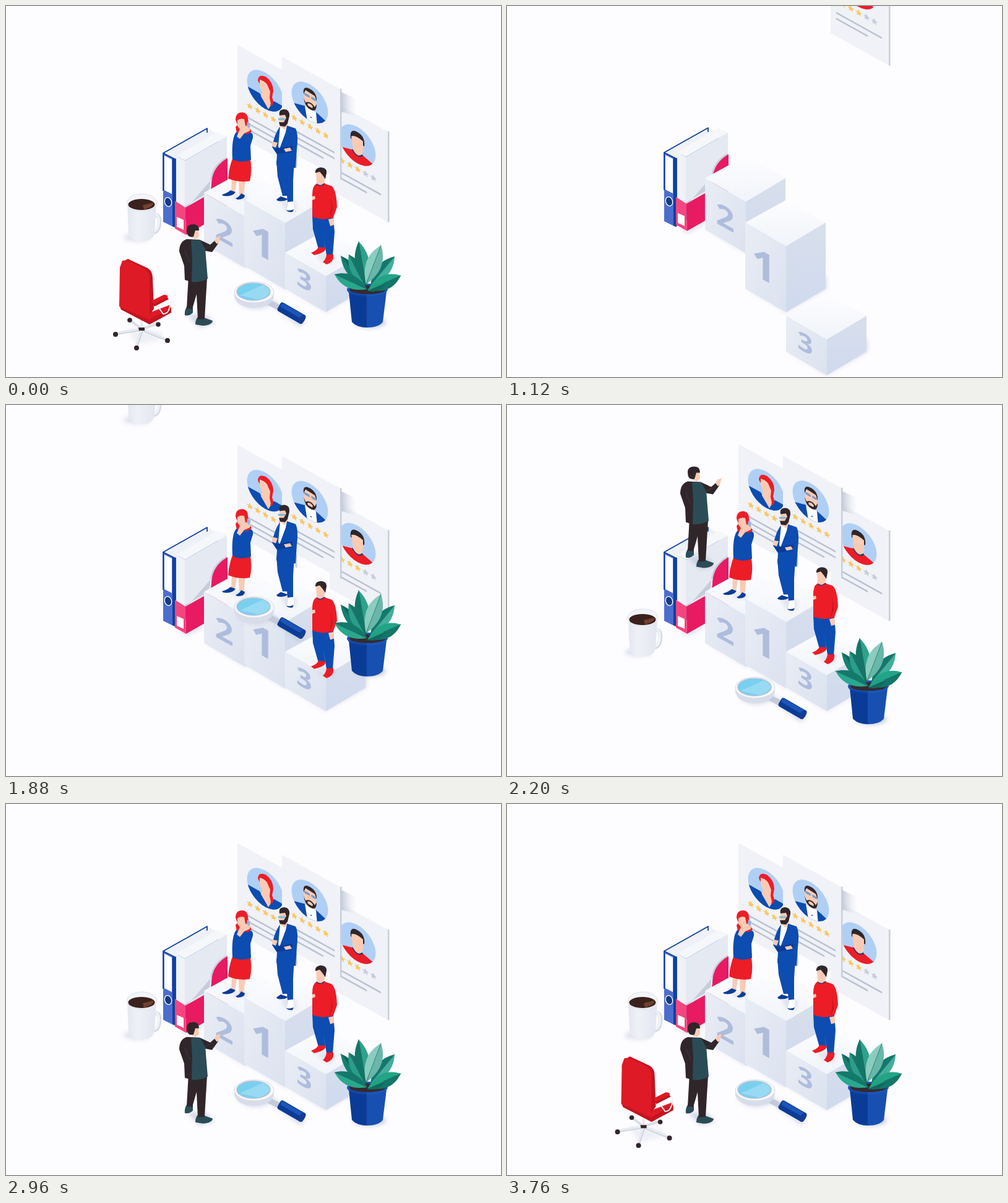
An HTML page for the animation above (3.8 s loop, 800 px wide and 600 px high).

```html
<!DOCTYPE html>
<html lang="en">
<head>
<meta charset="utf-8">
<title>Candidate podium</title>
<style>
html, body { margin: 0; width: 100%; height: 100%; overflow: hidden; background: #fdfcff; }
svg { display: block; width: 800px; height: 600px; }
.b { fill: #0d4cb0 } .n { fill: #0a3c97 } .r { fill: #ec1d27 } .m { fill: #c4141f }
.k { fill: #f9cbb4 } .d { fill: #30262a } .t { fill: #2b4c57 } .w { fill: #fff }
.s { fill: #b7bfd4; filter: url(#soft) }
.num { font: 700 40px "Open Sans", "Noto Sans", sans-serif; fill: #aebddb; text-anchor: middle }
.line { fill: none; stroke-linecap: round; stroke-linejoin: round }
#chair .r { fill: #de1a26 }
</style>
</head>
<body>
<svg viewBox="0 0 800 600">
<defs>
  <filter id="soft" x="-40%" y="-40%" width="180%" height="180%"><feGaussianBlur stdDeviation="3"/></filter>
  <linearGradient id="top" x2="0" y2="1"><stop stop-color="#fdfdff"/><stop offset="1" stop-color="#f1f4f9"/></linearGradient>
  <linearGradient id="left" x2="1" y2="1"><stop stop-color="#e9edf5"/><stop offset="1" stop-color="#dbe2ef"/></linearGradient>
  <linearGradient id="right" x2="0" y2="1"><stop stop-color="#d8dfec"/><stop offset="1" stop-color="#cfdaee"/></linearGradient>
  <linearGradient id="cup"><stop stop-color="#e4e7f0"/><stop offset=".35" stop-color="#eff1f7"/><stop offset="1" stop-color="#e2e5ef"/></linearGradient>
  <linearGradient id="cast"><stop stop-color="#b4bccb" stop-opacity=".8"/><stop offset="1" stop-color="#dfe3ec" stop-opacity="0"/></linearGradient>
  <clipPath id="disc"><circle cx="45" cy="49" r="29.5"/></clipPath>
</defs>

<g id="binder">
  <path fill="#1853b0" d="M272 247 343 207V317L272 358Z"/>
  <path fill="#eef1f7" d="M254 238 325 198 343 208 272 248Z"/>
  <path fill="#4c6dcc" d="M254 238 272 247V358L254 349Z"/>
  <path fill="#0f409f" d="M269 246 274 247V358L269 356Z"/>
  <path class="line" stroke="#0f409f" stroke-width="1.8" d="M325 204V198L254 238 272 247M254 238V298"/>
  <path class="w" d="M256 242 268 248V304L256 298Z"/>
  <ellipse cx="262" cy="317" rx="5.5" ry="7.5" fill="#123a86" stroke="#fff" stroke-width="1.3" transform="rotate(-18 262 317)"/>
</g>

<g id="file">
  <path class="s" opacity=".4" d="M280 366 320 348 316 362 291 374Z"/>
  <path fill="#f5f7fb" d="M275 242 342 204 357 211 289 250Z"/>
  <path fill="#f0f2f8" d="M275 242 289 250V328L275 319Z"/>
  <path fill="#e5e9f2" d="M289 250 357 211V290L289 328Z"/>
  <path fill="#c6cddb" d="M289 324 320 306Q330 300 330 287 330 259 357 244V252L289 330Z"/>
  <path fill="#e81a62" d="M290 326 320 309Q332 302 332 290 332 261 358 246V332L291 370Z"/>
  <path fill="#f54580" d="M273 315 290 326 291 370 273 360Z"/>
  <path class="w" d="M276 341 287 346V362L276 357Z"/>
</g>

<g id="poster3"></g>
<g id="poster1"></g>
<g id="poster2"></g>
<g id="podium2"></g>
<g id="podium1"></g>
<g id="podium3"></g>

<g id="woman">
  <path class="s" opacity=".35" d="M362 304 390 306 388 313 370 313Z"/>
  <path class="k" d="M365 275 374 278 370 301 364 302ZM376 280 387 280 384 307 377 309Z"/>
  <path class="n" d="M349 305Q357 303 363 298L371 301Q366 309 351 307ZM371 311Q378 308 380 303L386 306Q386 313 374 313Z"/>
  <path class="r" d="M366 247 395 249Q398 268 394 283 376 286 359 279 360 262 366 247Z"/>
  <path class="b" d="M372 204Q364 214 366 248 380 255 396 249L395 226 399 213Q400 205 394 204 382 199 372 204Z"/>
  <path class="r" d="M371 184Q371 172 382 172 391 173 391 183L393 196 397 203 391 207 373 205 371 196 374 192Z"/>
  <path class="k" d="M374 185Q378 181 385 183L387 194 396 191 394 202 385 206 378 215 373 211 378 199 374 194Z"/>
  <path fill="#8fb5e8" d="M390 187 395 190 393 198 389 194Z"/>
</g>

<g id="suit">
  <path class="s" opacity=".35" d="M440 309 470 318 468 331 452 331Z"/>
  <path class="w" stroke="#d3d9e6" stroke-width=".6" d="M437 313Q445 309 448 304L457 307Q453 316 440 316ZM453 330Q456 321 456 315L465 316Q467 327 464 332 457 334 453 330Z"/>
  <path class="b" d="M437 250 466 250 464 282 464 316 455 317 452 285 455 307 447 307 439 276Z"/>
  <path class="n" d="M437 313Q441 310 444 308L456 312Q450 317 439 315ZM453 330Q458 332 465 329L463 333Q456 334 453 330Z"/>
  <path class="b" d="M442 196 453 193 468 198Q473 207 470 232L468 262 437 257 438 240 430 228Q434 207 442 196Z"/>
  <path class="w" d="M443 195 454 194 452 204 442 231 440 227Z"/>
  <path class="n" d="M433 231 463 226 462 236 438 239Z"/>
  <path class="k" d="M430 219 439 221 436 229 430 227ZM449 231 459 229 462 234 452 236Z"/>
  <path class="k" d="M442 174 455 173 456 190 451 200 442 194Z"/>
  <path class="d" d="M442 177Q440 167 450 167 459 168 458 178L455 190 451 195 443 194 441 188 449 188 453 181 451 176Z"/>
  <path class="line" stroke="#7fb8d6" stroke-width="3" d="M441 183 450 183"/>
</g>

<g id="sweater">
  <path class="s" opacity=".35" d="M500 398 534 403 528 417 510 414Z"/>
  <path class="b" d="M495 338 529 341 531 366 528 404 518 403 513 372 516 392 505 393 496 361Z"/>
  <path class="r" d="M493 399Q502 396 505 390L517 391Q517 399 498 403ZM512 414Q517 410 518 402L529 402Q531 414 518 418Z"/>
  <path class="r" d="M501 288Q495 291 495 306L495 341Q513 348 529 342L535 325Q534 297 526 291L514 287Z"/>
  <path class="m" d="M525 309 528 329 522 346 526 327Z"/>
  <path class="k" d="M521 345 530 343 530 354 524 356ZM495 308 499 307 500 312 495 314Z"/>
  <path class="k" d="M501 268 515 267 515 284 509 291 502 287Z"/>
  <path class="d" d="M500 270Q499 262 509 261 519 262 518 270L516 280 512 274 507 268Z"/>
  <path class="line" stroke="#1c3d7f" stroke-width="1.4" d="M502 288Q508 293 515 287"/>
</g>

<g id="mug">
  <ellipse class="s" opacity=".4" cx="212" cy="374" rx="22" ry="7"/>
  <path class="line" stroke="#d5dae7" stroke-width="6" d="M236 338Q250 335 248 352 247 367 234 367"/>
  <path class="line" stroke="#f3f5fa" stroke-width="3" d="M235 337Q249 334 247 352 246 366 233 366"/>
  <path fill="url(#cup)" d="M196 318 198 368Q203 381 219 381 236 381 240 368L243 318Z"/>
  <ellipse cx="219.500" cy="318" rx="24" ry="14" fill="#f3f5fa" stroke="#dde1eb"/>
  <ellipse cx="219" cy="321" rx="21.500" ry="9" fill="#3b211d"/>
  <path fill="#71402f" d="M221 322 238 318Q239 325 223 329Z"/>
</g>

<g id="magnifier">
  <path class="s" opacity=".5" d="M372 474Q390 500 428 484L474 519 484 512 430 474Z"/>
  <path fill="#c4cada" d="M424 474 444 484 440 492 420 482Z"/>
  <path fill="#d8ddea" d="M369 462V471Q375 488 402 488 430 487 433 469V461Z"/>
  <ellipse cx="401" cy="463" rx="32" ry="17" fill="#f6f8fc" stroke="#d7dce8"/>
  <ellipse cx="400" cy="462" rx="27" ry="14" fill="#78d0ef" stroke="#b7c1d3" stroke-width="1.5"/>
  <path fill="#98daf3" d="M378 468 415 451Q426 456 426 463 423 470 409 475Z"/>
  <g transform="rotate(30 462 497)">
    <rect x="438" y="489" width="47" height="16" rx="4" class="n"/>
    <rect x="440" y="490" width="42" height="7" rx="2" fill="#1c54b8"/>
    <ellipse cx="481" cy="497" rx="4.500" ry="8" fill="#143d93"/>
  </g>
</g>

<g id="plant">
  <ellipse class="s" opacity=".7" cx="588" cy="512" rx="26" ry="9"/>
  <path class="n" d="M554 462 559 511Q567 520 584 520V460Z"/>
  <path fill="#1750b0" d="M583 460V520Q602 520 609 511L615 462Z"/>
  <path fill="#0e46a6" d="M551 459Q553 469 583 470V456Z"/>
  <path fill="#1b57ba" d="M583 456V470Q613 469 617 459Z"/>
  <ellipse cx="584" cy="458" rx="33" ry="9" fill="#1b57ba"/>
  <ellipse cx="584" cy="459" rx="29" ry="7" fill="#352a31"/>
  <g id="leaves"></g>
</g>

<g id="boss">
  <path class="s" opacity=".6" d="M292 498 324 500 337 514 312 520Z"/>
  <path class="t" d="M289 500Q288 492 293 485L302 487 302 496Q296 502 289 500ZM306 515Q306 507 310 503L320 504 334 509Q333 516 318 517Z"/>
  <path class="d" d="M295 436 325 440 323 472 321 506 310 507 308 466 301 490 292 489Z"/>
  <path class="d" d="M292 377Q280 381 280 397L288 420 289 443Q306 450 325 442L322 396 333 398 343 384 338 379 330 386 313 378Z"/>
  <path class="t" d="M299 378 314 379 322 393 326 441Q313 448 300 446L301 408Z"/>
  <path class="line" stroke="#3f3436" stroke-width="1.200" d="M289 395 297 414M322 393 331 388"/>
  <path class="k" d="M337 380 340 374 347 372 344 382 341 385ZM299 364 311 362 312 372 307 377 301 375Z"/>
  <path class="d" d="M292 362Q292 353 303 353 312 353 312 363L306 363 303 373Q292 376 292 362Z"/>
</g>

<g id="chair">
  <path class="s" opacity=".2" d="M195 522 248 526 254 538 212 548Z"/>
  <path class="line" stroke="#d9dde6" stroke-width="4" d="M219 522 200 508M219 522 246 514"/>
  <g class="d"><circle cx="200" cy="508" r="3.800"/><circle cx="246" cy="515" r="3.800"/></g>
  <path class="line" stroke="#e6e9f0" stroke-width="4" d="M219 510V522L179 529M219 522 211 549M219 522 259 539"/>
  <path class="line" stroke="#b9c0ce" d="M217 525 180 531M221 525 213 549M222 526 259 541"/>
  <path class="d" d="M214 520 224 520 224 525 215 525Z"/>
  <g class="d"><circle cx="177" cy="531" r="4"/><circle cx="211" cy="553" r="4"/><circle cx="261" cy="541" r="4"/></g>
  <path class="r" d="M183 478 232 496 266 483 267 495 233 514 186 490Z"/>
  <path class="m" d="M184 486 232 507 267 488V496L232 515 186 491Z"/>
  <path class="m" d="M190 413 197 409 229 424Q237 429 237 439L239 490 230 502 228 440Z"/>
  <path class="r" d="M188 412Q195 409 224 425 232 431 232 440L232 508 183 486 184 423Z"/>
  <path class="line" stroke="#f2f3f8" stroke-width="2" d="M244 484 254 498Q265 498 266 477"/>
  <path class="m" d="M236 481 260 470 263 474 240 486Z"/>
  <path class="r" d="M235 477 255 467Q263 467 261 471L239 482Z"/>
</g>
</svg>
<script>
const LOOP = 3800, STEP = 40, START = 600;
const el = id => document.getElementById(id);

// Posters
const star = (x, y, fill) => {
  const pts = Array.from({ length: 10 }, (_, i) => {
    const r = i % 2 ? 2.6 : 5.6, a = i * Math.PI / 5 - Math.PI / 2;
    return [x + r * Math.cos(a), y + r * Math.sin(a)].map(v => v.toFixed(1));
  });
  return `<polygon points="${pts.join(" ")}" fill="${fill}"/>`;
};

const faces = {
  poster1: `<path class="b" d="M-32 9H-9L5 27 14 9H32V32H-32Z"/><path class="r" d="M-12-10Q-11-22 1-23 13-21 13-7L11 5Q16 13 9 20L4 12Z"/>
    <path class="k" d="M-9-13Q-2-15 3-12L8-3 7 8 9 16 5 27-7 13-5 5-9-2Z"/>`,
  poster2: `<path class="b" d="M-32 17-8 10 10 10 32 18V34H-32Z"/><path class="w" d="M-8 10H10L12 32H-4Z"/>
    <path class="k" d="M-10-16H10L10 0 6 10-5 10-9 2Z"/><path class="d" d="M-10-8Q-12-22 0-22 12-22 11-8L8-15-7-16ZM-10-2-7 4Q1-4 8 3L11-3Q11 11 1 11-8 11-10-2Z"/>
    <path class="k" d="M-4 4Q1 0 5 4L4 7H-3Z"/><path class="line" stroke="#7b9cc5" stroke-width="4" d="M-7-9H-2M4-9H8"/><circle cx="2" cy="23" r="1" class="n"/>`,
  poster3: `<path class="r" d="M-32 19-9 12H9L32 19V34H-32Z"/><path class="d" d="M-11-5Q-13-21 0-21 13-21 11-4Z"/>
    <path class="k" d="M-10-9Q-3-15 9-11L9 5 6 14Q0 20-6 14L-8 5Z"/><path class="line" stroke="#263a70" stroke-width="2" d="M-8 12Q0 22 8 12"/>`
};

function poster(id, x, y, gold, lines) {
  const stars = [0, 1, 2, 3, 4].map(i => star(20 + i * 12.7, 88, i < gold ? "#fac763" : "#c6ccda")).join("");
  const rows = lines.map((end, i) => `M10 ${108 + i * 9.5}H${end}`).join("");
  const cast = id === "poster2" ? `<path fill="url(#cast)" d="M95 4 120 2V30L95 36Z"/>` : "";
  el(id).innerHTML = `<g transform="matrix(1 .555 0 1 ${x} ${y})">${cast}
    <path fill="#f0f2f7" d="M0 0H95V146H0Z"/><path fill="#c6cedd" d="M94 0 96.500-2V145L94 146Z"/>
    <circle cx="45" cy="49" r="29.5" fill="#b0cff5"/>
    <g clip-path="url(#disc)"><g transform="translate(45 49)">${faces[id]}</g></g>
    ${stars}<path class="line" stroke="#bac1d3" stroke-width="2.8" d="${rows}"/></g>`;
}
poster("poster1", 374, 63, 4, [84, 84, 66]);
poster("poster2", 446, 82, 5, [84, 84, 66]);
poster("poster3", 523, 151, 3, [82, 59]);

// Podium blocks
function podium(n, x, y, h, cx, cy, size) {
  el("podium" + n).innerHTML = `
    <path class="s" opacity=".45" d="M${x + 4} ${y + h}l62 38 66-38v-20h-60z"/>
    <path fill="url(#top)" d="M${x} ${y}l65-36 65 36-64 38z"/>
    <path fill="url(#left)" d="M${x} ${y}l66 38v${h}l-66-38z"/>
    <path fill="url(#right)" d="M${x + 66} ${y + 38}l64-38v${h}l-64 38z"/>
    <text class="num" style="font-size:${size}px" transform="matrix(1.08 .6 0 1 ${cx} ${cy})" y="${size * .357}">${n}</text>`;
}
podium(2, 320, 302, 83, 352.5, 365, 49);
podium(1, 385, 313, 107, 415, 383, 64);
podium(3, 451, 399, 58, 482, 443, 41);

// Leaves: two halves around a straight rib
function leaf(tx, ty, bx, by, w, light, dark) {
  const dx = tx - bx, dy = ty - by, len = Math.hypot(dx, dy), nx = -dy / len * w, ny = dx / len * w;
  const half = (s, fill) => {
    const c = (k, f) => `${(bx + dx * k + nx * s * f).toFixed(1)} ${(by + dy * k + ny * s * f).toFixed(1)}`;
    return `<path fill="${fill}" d="M${bx} ${by}C${c(.25, .9)} ${c(.62, 1.6)} ${tx} ${ty}Z"/>`;
  };
  return half(1, dark) + half(-1, light) +
    `<path class="line" stroke="#0d5f57" stroke-width=".7" d="M${bx} ${by}L${tx} ${ty}"/>`;
}
el("leaves").innerHTML = [
  [541, 404, 580, 456, 9, "#138070", "#0e675d"],
  [554, 402, 580, 452, 10, "#2b9d88", "#17766a"],
  [570, 381, 582, 452, 12, "#147567", "#2da28c"],
  [628, 405, 589, 452, 11, "#12796c", "#43ae9b"],
  [531, 434, 584, 458, 11, "#28a88c", "#14786a"],
  [638, 436, 585, 459, 12, "#22a586", "#137668"],
  [606, 387, 582, 450, 13, "#8accbf", "#68b7a9"],
  [612, 449, 584, 461, 6, "#23a084", "#126a5f"]
].map(a => leaf(...a)).join("");

// id: [landing time, speed px/ms, approach direction x, y]
const moves = {
  binder: [830, 1.385, 0, 1], file: [930, 1.3, 0, 1],
  podium2: [1086, .81, 0, -1], podium1: [1166, .81, 0, -1], podium3: [1246, .81, 0, -1],
  poster3: [1345, 1.125, 0, 1], poster2: [1450, 1.2, 0, 1], poster1: [1540, 1.3, 0, 1],
  woman: [1620, 1.3, 0, 1], suit: [1700, 1.33, 0, 1], sweater: [1800, 1.6, 0, 1],
  plant: [1940, 1.35, 0, 1], magnifier: [1965, 1.6, 0, 1], mug: [2130, 1.4, 0, 1],
  boss: [2395, 1.3, 0, 1], chair: [3400, 1.3, .894, -.447]
};
const parts = Object.entries(moves).map(([id, move]) => ({ node: el(id), move }));

// Steady approach, then a damped swing around the resting place
function travel(age, speed) {
  if (age < 0) return age * speed;
  const s = age / 1000;
  return 49 * Math.sin(2 * Math.PI * 3.3 * s) * Math.exp(-9 * s);
}

function draw() {
  const t = Math.floor(performance.now() % LOOP / STEP) * STEP;
  const settled = t < STEP;
  for (const { node, move: [land, speed, x, y] } of parts) {
    const d = settled ? 0 : travel(t - land, speed);
    node.style.display = settled || t >= START ? "" : "none";
    node.setAttribute("transform", `translate(${(d * x).toFixed(2)} ${(d * y).toFixed(2)})`);
  }
  requestAnimationFrame(draw);
}
draw();
</script>
</body>
</html>
```
